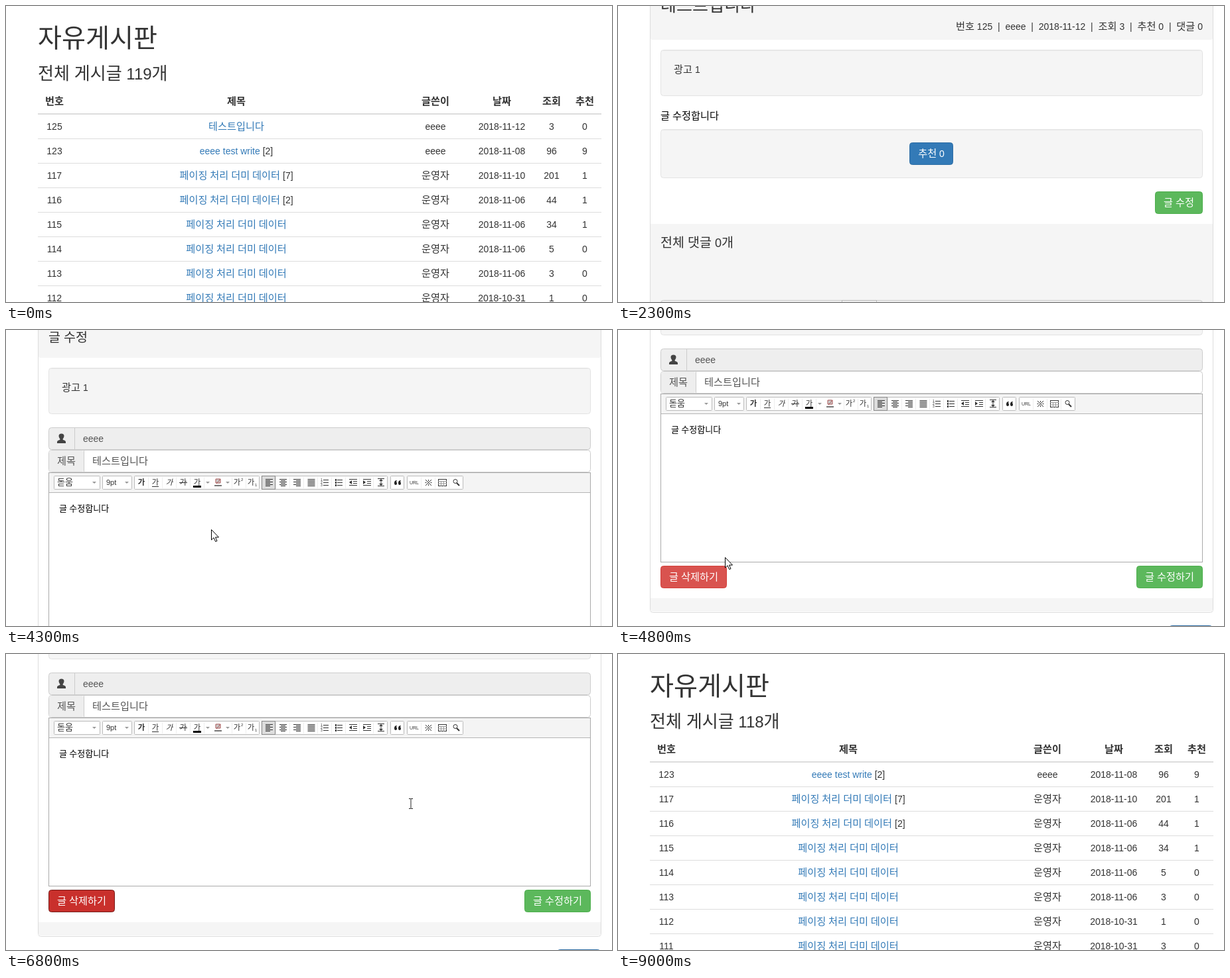
These frames come from a looping animation (913x447 px, 9700 ms). An HTML page:

```html
<!DOCTYPE html>
<html lang="ko">
<head>
<meta charset="utf-8">
<title>자유게시판</title>
<style>
html, body { margin: 0; width: 100%; height: 100%; overflow: hidden; background: #fff; }
svg { display: block; width: 913px; height: 447px; }
text { font-family: "Liberation Sans", Arial, sans-serif; white-space: pre; }
.ko { font-family: "Noto Sans CJK KR", "Noto Sans CJK", sans-serif; }
.hover .first { fill: #23527c; text-decoration: underline; }
</style>
</head>
<body>
<svg id="stage" viewBox="0 0 913 447" xmlns="http://www.w3.org/2000/svg"></svg>
<script>
const LOOP = 9700, STEP = 100;
const BLUE = '#337ab7', BLUE_EDGE = '#2e6da4', GREEN = '#5cb85c', GREEN_EDGE = '#4cae4c';
const USER = 'eeee', POST = '테스트입니다', BODY = '글 수정합니다';
const stage = document.getElementById('stage');

// Hangul is set larger so that one syllable is one em wide.
function spans(str, size, fill, cls = '') {
  return str.match(/[가-힣]+|[^가-힣]+/g).map(run => {
    const ko = /[가-힣]/.test(run);
    const px = ko ? size / 0.92 : size;
    return `<tspan class="${ko ? 'ko' : ''} ${cls}" font-size="${px.toFixed(2)}" fill="${fill}">${run}</tspan>`;
  }).join('');
}

function text(x, y, str, { size = 14, fill = '#333', anchor = 'start', attrs = '', tail = '', cls = '' } = {}) {
  return `<text x="${x}" y="${y}" text-anchor="${anchor}" ${attrs}>` +
    spans(str, size, fill, cls) + (tail && spans(tail, size, '#333')) + '</text>';
}
const centered = (x, y, str, opts = {}) => text(x, y, str, { ...opts, anchor: 'middle' });

const fillRect = (x, y, w, h, fill, attrs = '') =>
  `<rect x="${x}" y="${y}" width="${w}" height="${h}" fill="${fill}" ${attrs}/>`;
const box = (x, y, w, h, fill, edge, r = 4, attrs = '') =>
  fillRect(x + .5, y + .5, w - 1, h - 1, fill, `stroke="${edge}" rx="${r}" ${attrs}`);
const path = (d, attrs) => `<path d="${d}" ${attrs}/>`;

const button = (x, y, w, label, fill, edge, id = '') =>
  box(x, y, w, 34, fill, edge, 4, id && `id="${id}"`) +
  centered(x + w / 2, y + 22, label, { fill: '#fff' });
const well = (y, h) => box(64, y, 817, h, '#f5f5f5', '#e3e3e3') + fillRect(66, y + 1, 813, 1, '#eaeaea');

const banner =
  box(48, 16, 100, 100, '#fff', '#ddd') + fillRect(53, 21, 90, 90, '#8cc63f') +
  box(439, 24, 400, 34, '#fff', '#ccc') + text(452, 46, '통합검색', { fill: '#999' }) +
  button(843, 24, 54, '검색', BLUE, BLUE_EDGE) +
  text(48, 188, '자유게시판', { size: 36 });

const panel = (h, headH) =>
  box(48, 206, 849, h, '#fff', '#ddd') + fillRect(49, 207, 847, headH, '#f5f5f5', 'rx="3"');

function listPage(count, rows) {
  const cols = [73, 347, 647, 747, 822, 872];
  let out = banner + text(48, 237, `전체 게시글 ${count}개`, { size: 24 });
  ['번호', '제목', '글쓴이', '날짜', '조회', '추천'].forEach((name, i) => {
    out += centered(cols[i], 275, name, { attrs: 'font-weight="700"' });
  });
  out += fillRect(48, 288, 849, 2, '#ddd');
  rows.forEach(([no, title, replies, writer, day, views, likes], i) => {
    const y = 313 + i * 37;
    const cells = [no, title, writer, '2018-' + day, views, likes];
    cells.forEach((cell, c) => {
      const opts = c === 1
        ? { fill: BLUE, tail: replies ? ` [${replies}]` : '', cls: title === POST ? 'first' : '' }
        : {};
      out += centered(cols[c], y, String(cell), opts);
    });
    out += fillRect(48, y + 13, 849, 1, '#ddd');
  });
  return out;
}

function viewPage() {
  const meta = ['번호 125', USER, '2018-11-12', '조회 3', '추천 0', '댓글 0'].join('  |  ');
  return banner + panel(600, 93) +
    text(64, 257, POST, { size: 24 }) +
    text(881, 285, meta, { anchor: 'end' }) +
    well(315, 70) + text(84, 350, '광고 1') +
    text(64, 420, BODY, { fill: '#000' }) +
    well(435, 74) + button(439, 455, 66, '추천 0', BLUE, BLUE_EDGE) +
    button(809, 529, 72, '글 수정', GREEN, GREEN_EDGE) +
    fillRect(49, 578, 847, 220, '#f5f5f5') +
    text(64, 613, '전체 댓글 0개', { size: 18 }) +
    box(64, 693, 817, 34, '#eee', '#ccc') + box(337, 693, 53, 34, '#eee', '#bbb', 0);
}

// Toolbar drawn around its own top edge; y = 15 is the centre of the icons.
function toolbar() {
  const ink = 'stroke="#333" fill="none"';
  const down = x => path(`M${x - 3} 14h6l-3 3z`, 'fill="#999"');
  const group = (x, w) => box(x, 5, w, 21, '#fff', '#bbb', 1);
  const letter = (x, attrs = '') => centered(x, 19, '가', { size: 10.5, attrs });
  const small = (x, y, s) => text(x, y, s, { size: 6 });
  const lines = (x, widths, align = 0) => path(widths.map((w, i) =>
    `M${x - 5.5 + (11 - w) * align} ${10.5 + i * 2}h${w}`).join(''), ink);
  const cuts = (x, n) => {
    let d = '';
    for (let i = 1; i < n; i++) d += `M${x + 21 * i + .5} 7v17`;
    return path(d, 'stroke="#eee"');
  };
  const short = [11, 7, 11, 7, 11, 7], full = [11, 11, 11, 11, 11, 11];
  const list = x => path(`M${x - 2} 11.5h8m-8 4h8m-8 4h8`, ink);
  const indent = (x, dir) => path(`M${x - 6} 10.5h12M${x} 13.5h6m-6 3h6M${x - 6} 19.5h12`, ink) +
    path(dir < 0 ? `M${x - 6} 15l4-3v6z` : `M${x - 2} 15l-4-3v6z`, 'fill="#333"');

  return group(72, 70) + text(77, 19, '돋움', { size: 12 }) + down(133) +
    group(145, 45) + text(151, 19, '9pt', { size: 11 }) + down(182) +
    group(193, 189) + cuts(193, 9) +
    letter(204, 'font-weight="900"') +
    letter(225) + path('M220 21.5h10', ink) +
    letter(246, 'font-style="italic"') +
    letter(267) + path('M261 15.5h12', ink) +
    letter(288) + fillRect(282, 20, 12, 3, '#000') + down(304) +
    path('M316 10h7v6h-7zM317 17l6-7', 'stroke="#a55" fill="#ccc"') + fillRect(314, 19, 11, 2, '#777') + down(334) +
    letter(348) + small(354, 13, '2') + letter(369) + small(375, 21, '1') +
    group(385, 190) + cuts(385, 9) + box(385, 5, 21, 21, '#ddd', '#888', 0) +
    lines(396.5, short) + lines(417.5, short, .5) + lines(438.5, short, 1) + lines(460, full) +
    list(480) + ['1', '2', '3'].map((n, i) => text(474, 13 + i * 4, n, { size: 5 })).join('') +
    list(501) + [10, 14, 18].map(y => fillRect(496, y, 2, 3, '#333')).join('') +
    indent(523, -1) + indent(544, 1) +
    path('M560 9.5h10M560 20.5h10M565 12v6', ink) + path('M562 13l3-3 3 3zM562 17l3 3 3-3z', 'fill="#333"') +
    group(579, 21) + path('M585 16q0-4 4-4l-1 2q1 1 1 3t-2 2q-2 0-2-3zM591 16q0-4 4-4l-1 2q1 1 1 3t-2 2q-2 0-2-3z', 'fill="#222"') +
    group(604, 85) + cuts(604, 4) + centered(615, 18, 'URL', { size: 7 }) +
    path('M632 11l9 9m0-9l-9 9M636.5 11v2m0 5v2m-5-4.500h2m6 0h2', ink) +
    box(651, 10, 13, 11, '#fff', '#333', 0) + path('M651 13.500h13m-13 3.500h13M655.500 13v8m4-8v8', 'stroke="#999"') +
    `<circle cx="677" cy="13.500" r="3" ${ink}/>` + path('M679 16l4 4', 'stroke="#333" stroke-width="2"');
}

function editPage() {
  return banner + panel(564, 59) +
    text(64, 242, '글 수정', { size: 18 }) +
    well(281, 70) + text(84, 316, '광고 1') +
    box(64, 371, 817, 34, '#eee', '#ccc') + fillRect(103, 372, 1, 32, '#ccc') +
    path('M77 395v-2q0-2 4-3q1-1 0-2q-1.500-2-1.500-4q0-3.500 4-3.500t4 3.500q0 2-1.500 4q-1 1 0 2q4 1 4 3v2z', 'fill="#444"') +
    text(116, 393, USER, { fill: '#555' }) +
    box(64, 405, 817, 34, '#fff', '#ccc') + fillRect(65, 406, 52, 32, '#eee', 'rx="3"') + fillRect(117, 406, 1, 32, '#ccc') +
    text(77, 427, '제목', { fill: '#555' }) + text(130, 427, POST, { fill: '#555' }) +
    box(64, 439, 817, 255, '#fff', '#aaa', 0) + fillRect(65, 440, 815, 29, '#f4f4f4') + fillRect(65, 469, 815, 1, '#b5b5b5') +
    `<g transform="translate(0 439)">${toolbar()}</g>` +
    text(80, 498, BODY, { size: 12, fill: '#000' }) +
    button(64, 699, 100, '글 삭제하기', '#d9534f', '#d43f3a', 'remove') +
    button(781, 699, 100, '글 수정하기', GREEN, GREEN_EDGE) +
    fillRect(49, 748, 847, 20, '#f5f5f5') +
    button(830, 789, 66, '글쓰기', BLUE, BLUE_EDGE);
}

function dialog() {
  const label = { size: 12, fill: '#000' };
  return fillRect(0, 0, 913, 447, '#1a1a1a', 'opacity=".5"') +
    fillRect(506, 106, 242, 145, '#000', 'opacity=".18" rx="2"') +
    fillRect(508, 107, 238, 142, '#fff') + fillRect(508, 191, 238, 58, '#f0f0f0') + fillRect(508, 191, 238, 1, '#dfdfdf') +
    centered(627.5, 153.5, '글 삭제하시겠습니까?', label) +
    fillRect(562, 207, 71, 23, '#e1e1e1', 'id="ok" stroke="#0078d7" stroke-width="2"') +
    centered(597, 222.5, '확인', label) +
    box(646, 206, 74, 25, '#e1e1e1', '#adadad', 0) + centered(683, 222.5, '취소', label);
}

const pointers =
  `<g id="arrow">${path('M.5 .5V16L4 12.700 6.700 18.500 9 17.500 6.500 12H11.500Z', 'fill="#fff" stroke="#000"')}</g>` +
  `<g id="hand">${path('M-1.500 9V1.500Q-1.500 0 0 0T1.500 1.500V6.500Q4 5.500 4.500 7.500Q7 6.500 7.500 8.500Q10.500 7.500 10.500 10.500V15L8.500 18V21.500H-1.500V19L-6 13Q-6.500 11-4.500 10.700L-1.500 13Z', 'fill="#fff" stroke="#000"')}</g>` +
  `<g id="beam">${path('M-3 -7.500h2.500l.5 .5 .5-.5H3M0-7V7M-3 7.500h2.500l.5-.5 .5 .5H3', 'fill="none" stroke="#222"')}</g>`;

const dummy = '페이징 처리 더미 데이터', admin = '운영자';
const rows = [
  [125, POST, 0, USER, '11-12', 3, 0],
  [123, USER + ' test write', 2, USER, '11-08', 96, 9],
  [117, dummy, 7, admin, '11-10', 201, 1],
  [116, dummy, 2, admin, '11-06', 44, 1],
  [115, dummy, 0, admin, '11-06', 34, 1],
  [114, dummy, 0, admin, '11-06', 5, 0],
  [113, dummy, 0, admin, '11-06', 3, 0],
  [112, dummy, 0, admin, '10-31', 1, 0],
  [111, dummy, 0, admin, '10-31', 3, 0]
];

const layers = {
  before: listPage(119, rows), view: viewPage(), edit: editPage(),
  after: listPage(118, rows.slice(1)), dialog: dialog()
};
stage.innerHTML = fillRect(0, 0, 913, 447, '#fff') +
  Object.entries(layers).map(([id, body]) => `<g id="${id}">${body}</g>`).join('') + pointers;

const el = {};
stage.querySelectorAll('[id]').forEach(node => { el[node.id] = node; });
const show = (id, on) => el[id].setAttribute('display', on ? 'inline' : 'none');
const paint = (id, fill, edge) => {
  el[id].setAttribute('fill', fill);
  el[id].setAttribute('stroke', edge);
};

// [page, start, scroll keys as [time, offset]]
const pages = [
  ['before', 0, [[0, 126]]],
  ['view', 1400, [[1900, 0], [2300, 249]]],
  ['edit', 3000, [[3900, 0], [4100, 104], [4500, 343]]],
  ['after', 7200, [[7700, 0], [7900, 77], [8200, 126]]]
];

// Pointer trips: [time, x, y], visible from the first key up to the end time.
const trips = [
  { end: 2100, keys: [[100, 858, 33], [1000, 349, 185], [1100, 348, 184], [1400, 348, 184], [1800, 240, 180], [2000, -6, 92]] },
  { end: 5400, keys: [[2500, -6, 92], [2900, 845, 297], [3100, 845, 297], [3800, 309, 301], [4500, 309, 301], [4800, 161, 343], [4900, 150, 354], [5100, 142, 364], [5400, 142, 364]] },
  { end: 9000, keys: [[5400, 142, 364], [5500, 142, 364], [6100, 646, 134], [6300, 629, 157], [6500, 606, 224], [6700, 606, 224], [6800, 610, 226], [8500, 610, 226], [8700, 700, 180], [8900, 864, 257]] }
];

function along(keys, t, i = 1) {
  if (t <= keys[0][0]) return keys[0][i];
  for (let k = 1; k < keys.length; k++) {
    const a = keys[k - 1], b = keys[k];
    if (t < b[0]) return a[i] + (b[i] - a[i]) * (t - a[0]) / (b[0] - a[0]);
  }
  return keys[keys.length - 1][i];
}

function draw(t) {
  const current = pages.filter(p => p[1] <= t).pop();
  pages.forEach(p => show(p[0], p === current));
  const offset = Math.round(along(current[2], t));
  el[current[0]].setAttribute('transform', `translate(0 ${-offset})`);

  const between = (a, b) => t >= a && t < b;
  el.before.classList.toggle('hover', between(900, 1400));
  if (t < 5000) paint('remove', '#d9534f', '#d43f3a');
  else paint('remove', '#c9302c', t < 5400 ? '#ac2925' : '#761c19');
  show('dialog', between(5400, 6700));
  el.ok.setAttribute('fill', t >= 6400 ? '#e5f1fb' : '#e1e1e1');

  const trip = trips.find(p => between(p.keys[0][0], p.end));
  const shape = between(900, 1400) || between(2900, 3000) ? 'hand'
    : between(4100, 4300) || between(6700, 7200) ? 'beam' : 'arrow';
  ['arrow', 'hand', 'beam'].forEach(id => show(id, trip && id === shape));
  if (trip) {
    const x = Math.round(along(trip.keys, t)), y = Math.round(along(trip.keys, t, 2));
    el[shape].setAttribute('transform', `translate(${x} ${y})`);
  }
}

function tick() {
  const t = performance.now() % LOOP;
  draw(Math.floor(t / STEP) * STEP);
  requestAnimationFrame(tick);
}
tick();
</script>
</body>
</html>
```
